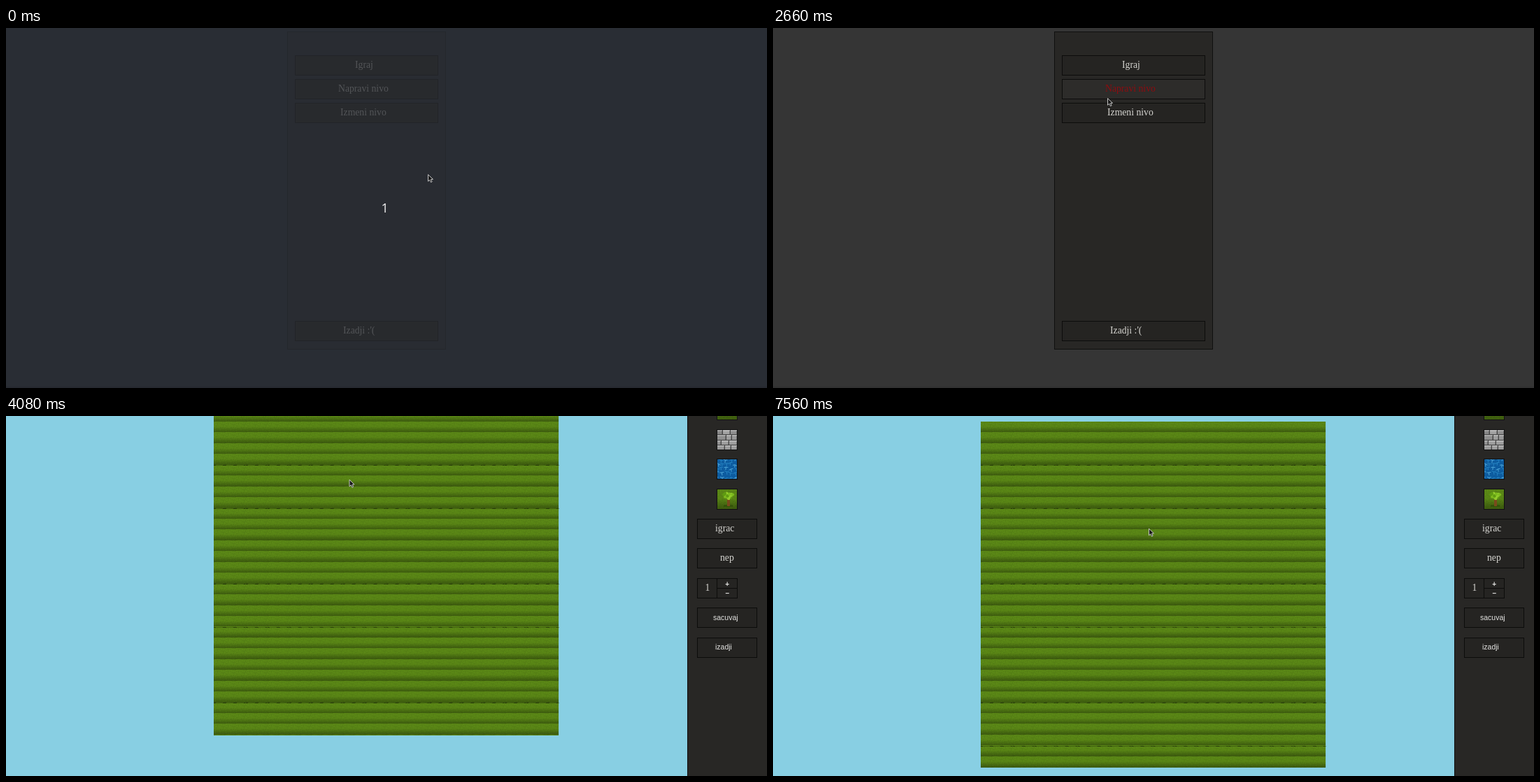
Animation, 1088 px wide and 515 px high, one loop 8 s. Source, as an HTML page with a canvas:

```html
<!DOCTYPE html>
<html lang="sr-Latn">
<head>
<meta charset="utf-8">
<title>Level editor</title>
<style>
html, body { margin: 0; width: 100%; height: 100%; overflow: hidden; background: #353535; }
canvas { display: block; }
</style>
</head>
<body>
<canvas id="stage" width="1088" height="515"></canvas>
<script>
const W = 1088, H = 515, LOOP = 8000;
const ctx = document.getElementById('stage').getContext('2d');
const SERIF = '13.7px "Liberation Serif", serif';
const SANS = '10.5px "Liberation Sans", sans-serif';

const MENU = [
  { text: 'Igraj', x: 499, y: 39 },
  { text: 'Napravi nivo', x: 475, y: 73 },
  { text: 'Izmeni nivo', x: 478, y: 107 },
  { text: "Izadji :'(", x: 482, y: 419 }
];

// Pointer jumps: time, x, y
const POINTER = [
  [0, 603, 209], [1800, 605, 209], [2120, 573, 175], [2520, 478, 100],
  [2920, 489, 91], [3200, 490.5, 90.5], [5060, 498, 121], [5440, 537, 160.5]
];

const GRID = { x: 297, y: 8, cell: 15.45, cols: 32 };

function seeded(seed) {
  return () => (seed = (seed * 16807) % 2147483647) / 2147483647;
}

function makeCanvas(w, h, draw) {
  const c = document.createElement('canvas');
  c.width = w;
  c.height = h;
  draw(c.getContext('2d'));
  return c;
}

function box(x, y, w, h, fill, line) {
  ctx.fillStyle = fill;
  ctx.fillRect(x, y, w, h);
  ctx.strokeStyle = line;
  ctx.lineWidth = 1;
  ctx.strokeRect(x + 0.5, y + 0.5, w - 1, h - 1);
}

function label(text, x, y, font, color) {
  ctx.font = font;
  ctx.fillStyle = color;
  ctx.fillText(text, x, y);
}

// Grass: bright at the top, dark near the bottom edge, lightly speckled
function paintGrass(g, size, seed) {
  const rnd = seeded(seed);
  for (let y = 0; y < size; y++) {
    const v = y / (size - 1);
    const shade = v < 0.45 ? 1 : 1 - 0.29 * Math.min(1, (v - 0.45) / 0.45);
    for (let x = 0; x < size; x++) {
      const k = shade * (0.95 + rnd() * 0.1);
      g.fillStyle = `rgb(${89 * k | 0},${133 * k | 0},${22 * k | 0})`;
      g.fillRect(x, y, 1, 1);
    }
  }
}

const grassTile = makeCanvas(16, 16, g => paintGrass(g, 16, 41));

const field = makeCanvas(495, 496, g => {
  const { cell, cols } = GRID;
  for (let r = 0; r < cols; r++) {
    for (let c = 0; c < cols; c++) {
      g.drawImage(grassTile, Math.floor(c * cell), Math.floor(r * cell + 0.4));
    }
  }
  // Rounding seams between some rows
  for (const r of [4, 8, 15, 19, 26, 30]) {
    const y = Math.round(r * cell);
    g.fillStyle = 'rgba(40,60,8,0.45)';
    g.fillRect(0, y, 495, 1);
    g.fillStyle = '#263a0a';
    for (let c = 0; c < cols; c++) {
      g.fillRect(Math.floor(c * cell), y, 3, 1);
      g.fillRect(Math.floor(c * cell) + 13, y, 2, 1);
    }
  }
});

const stoneIcon = makeCanvas(28, 28, g => {
  const rnd = seeded(7);
  g.fillStyle = '#454545';
  g.fillRect(0, 0, 28, 28);
  const rows = [[0, 6, [0, 8, 19]], [7, 7, [0, 13, 21]], [15, 6, [0, 6, 17]], [22, 6, [0, 11, 20]]];
  for (const [y, h, xs] of rows) {
    xs.forEach((x, i) => {
      const w = (xs[i + 1] || 29) - x - 1;
      const v = 135 + rnd() * 30 | 0;
      g.fillStyle = `rgb(${v},${v},${v})`;
      g.fillRect(x, y, w, h);
      g.fillStyle = 'rgba(255,255,255,0.22)';
      g.fillRect(x, y, w, 2);
      g.fillStyle = 'rgba(0,0,0,0.22)';
      g.fillRect(x + w - 1, y + 1, 1, h - 1);
    });
  }
});

const waterIcon = makeCanvas(28, 28, g => {
  const rnd = seeded(23);
  g.fillStyle = '#0d5ca0';
  g.fillRect(0, 0, 28, 28);
  g.lineWidth = 0.9;
  for (let r = 0; r < 5; r++) {
    for (let c = 0; c < 5; c++) {
      const x = c * 6.5 + rnd() * 4 - 2, y = r * 6.5 + rnd() * 4 - 2;
      g.strokeStyle = rnd() < 0.4 ? '#55aede' : '#2886c4';
      g.beginPath();
      g.moveTo(x - 3, y + rnd() * 4 - 2);
      g.lineTo(x, y);
      g.lineTo(x + 3, y + rnd() * 4 - 2);
      g.moveTo(x, y);
      g.lineTo(x + rnd() * 2 - 1, y + 4);
      g.stroke();
    }
  }
});

const grassIcon = makeCanvas(28, 28, g => paintGrass(g, 28, 11));

const treeIcon = makeCanvas(28, 28, g => {
  g.drawImage(grassIcon, 0, 0);
  const rnd = seeded(5);
  g.fillStyle = 'rgba(40,70,5,0.5)';
  g.fillRect(9, 22, 13, 3);
  g.fillStyle = '#7a4a1c';
  g.fillRect(14, 13, 4, 11);
  for (let i = 0; i < 26; i++) {
    const a = rnd() * Math.PI * 2, d = rnd();
    g.fillStyle = ['#5f9a12', '#7dbb1e', '#93cc2c'][i % 3];
    g.beginPath();
    g.arc(15.5 + Math.cos(a) * d * 8, 8.5 + Math.sin(a) * d * 5, 2.2, 0, 7);
    g.fill();
  }
});

function drawMenu(t) {
  const faded = t < 260;
  ctx.fillStyle = faded ? '#292d34' : '#353535';
  ctx.fillRect(0, 0, W, H);
  ctx.fillStyle = 'rgba(0,0,0,0.08)';
  ctx.fillRect(0, H - 2, W, 2);
  box(402, 5, 227, 455, faded ? '#292c32' : '#282725', faded ? '#24272c' : '#10100f');

  for (const { text, x, y } of MENU) {
    const redIzmeni = y === 107 && t >= 2380 && t < 2520;
    const redNapravi = y === 73 && t >= 2660;
    const hot = redIzmeni || redNapravi;
    const fill = faded ? '#282a2d' : hot ? '#2d2c2a' : '#252422';
    const line = faded ? '#222428' : '#0c0c0b';
    const ink = faded ? '#535558' : hot ? '#8d0c10' : '#d6d5d1';
    const shift = redNapravi && t >= 3660 ? 1 : 0;
    box(413, y, 205, 29, fill, line);
    label(text, x + shift, y + 18, SERIF, ink);
  }
  if (faded) label('1', 536.4, 264, '18px "Open Sans", sans-serif', '#f2f2f2');
}

function drawIcon(icon, y) {
  ctx.drawImage(icon, 1017, y);
  ctx.strokeStyle = '#111';
  ctx.lineWidth = 1;
  ctx.strokeRect(1016.5, y - 0.5, 29, 29);
}

function drawSidebar() {
  const fill = '#252422', line = '#0c0c0b', ink = '#d6d5d1';
  ctx.fillStyle = '#282725';
  ctx.fillRect(974, 0, W - 974, H);
  ctx.fillStyle = '#10100f';
  ctx.fillRect(974, 0, 1, H);

  drawIcon(grassIcon, -23);
  drawIcon(stoneIcon, 20);
  drawIcon(waterIcon, 62);
  drawIcon(treeIcon, 105);

  for (const y of [147, 189, 274, 317]) box(988, y, 86, 29, fill, line);
  box(988, 232, 29, 29, fill, line);
  box(1016, 232, 30, 15, fill, line);
  box(1016, 246, 30, 15, fill, line);

  label('igrac', 1014, 164.5, SERIF, ink);
  label('nep', 1021, 207, SERIF, ink);
  label('1', 999.5, 250, SERIF, ink);
  label('sacuvaj', 1011, 292, SANS, '#e4e4e2');
  label('izadji', 1014, 334, SANS, '#e4e4e2');
  const bold = 'bold 10px "Liberation Sans", sans-serif';
  label('+', 1028.2, 243.5, bold, '#e4e4e2');
  label('–', 1028.4, 257, bold, '#e4e4e2');
}

function drawEditor(t) {
  ctx.fillStyle = t < 4080 ? '#353535' : '#88cfe3';
  ctx.fillRect(0, 0, W, H);

  // The field grows downward one row at a time
  const rows = t < 6720 ? 29 : t < 7160 ? 30 : t < 7560 ? 31 : 32;
  const h = Math.round(rows * GRID.cell) + 1;
  ctx.drawImage(field, 0, 0, 495, h, GRID.x, GRID.y, 494, h);
  if (t < 7560) ctx.drawImage(field, 0, 7, 495, 8, GRID.x, 0, 494, 8);
  drawSidebar();
}

function drawPointer(t) {
  const [, x, y] = POINTER.filter(p => p[0] <= t).pop();
  const shape = [[0, 0], [0, 9.6], [2.3, 7.6], [3.9, 11], [5.6, 10.2], [4.1, 6.9], [7, 6.7]];
  ctx.beginPath();
  for (const [dx, dy] of shape) ctx.lineTo(x + 0.5 + dx, y + 0.7 + dy);
  ctx.closePath();
  ctx.fillStyle = '#1a1a1a';
  ctx.fill();
  ctx.strokeStyle = '#d4d4d4';
  ctx.lineWidth = 0.9;
  ctx.stroke();
}

function frame() {
  const t = performance.now() % LOOP;
  if (t < 3940) drawMenu(t);
  else drawEditor(t);
  drawPointer(t);
  requestAnimationFrame(frame);
}
frame();
</script>
</body>
</html>
```
